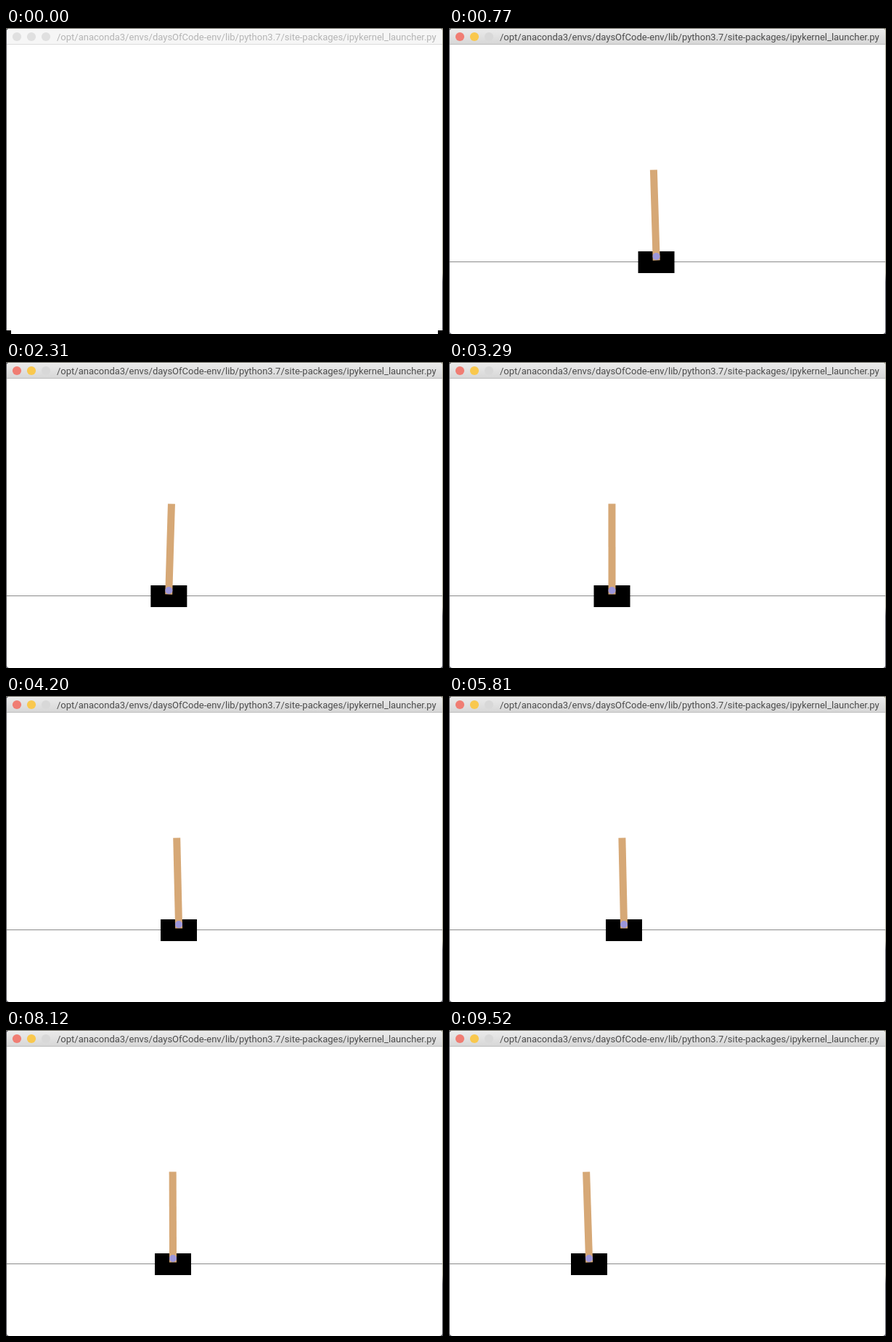
An HTML page for the animation above (9590 ms loop, 602x422 px).

```html
<!DOCTYPE html>
<html lang="en">
<head>
<meta charset="utf-8">
<title>Cart pole</title>
<style>
  html, body { margin: 0; width: 100%; height: 100%; overflow: hidden; background: #fff; }
  svg { display: block; width: 602px; height: 422px; }
  .title { font: 13px Roboto, sans-serif; fill: #4c4c4c; }
  .bar { fill: url(#bar); }
  .rule { fill: #bdbdbd; }
  .close { fill: #f07d73; }
  .minimise { fill: #f9c84e; }
  .zoom { fill: #d8d8d8; }
  .corner { display: none; }
  .idle .title { fill: #b4b4b4; }
  .idle .bar { fill: #f6f6f6; }
  .idle .rule { fill: #dcdcdc; }
  .idle .dot { fill: #e0e0e0; }
  .idle .scene { display: none; }
  .idle .corner { display: inline; }
</style>
</head>
<body>
<svg id="stage" class="idle" viewBox="0 0 602 422">
  <defs>
    <linearGradient id="bar" x2="0" y2="1">
      <stop stop-color="#ebebeb"/><stop offset="1" stop-color="#d7d7d7"/>
    </linearGradient>
    <linearGradient id="right" x2="0" y2="1">
      <stop offset=".8" stop-color="#a5a293"/><stop offset=".83" stop-color="#55555c"/>
    </linearGradient>
    <clipPath id="window"><rect x="1" y="1" width="600" height="421" rx="4"/></clipPath>
  </defs>
  <rect width="301" height="422" fill="#56565c"/>
  <rect x="301" width="301" height="422" fill="url(#right)"/>
  <rect width="602" height="1" fill="#66655c"/>
  <g clip-path="url(#window)">
    <rect width="602" height="422" fill="#fff"/>
    <rect class="bar" y="1" width="602" height="21"/>
    <rect class="rule" y="22" width="602" height="1"/>
  </g>
  <circle class="dot close" cx="15" cy="12" r="6.1"/>
  <circle class="dot minimise" cx="35" cy="12" r="6.1"/>
  <circle class="dot zoom" cx="55" cy="12" r="6.1"/>
  <text class="title" x="70" y="17">/opt/anaconda3/envs/daysOfCode-env/lib/python3.7/site-packages/ipykernel_launcher.py</text>
  <g class="scene">
    <rect x="1" y="322" width="600" height="1" fill="#8a8a8a"/>
    <g id="cart">
      <rect x="-25" y="308" width="50" height="30"/>
      <g id="pole"><rect x="-5" y="195.5" width="10" height="125" fill="#d6a876"/></g>
      <circle cy="315" r="5" fill="#9c96da"/>
    </g>
  </g>
  <path class="corner" d="M0 417h7v5h-7zM595 417h7v5h-7z"/>
</svg>
<script>
  const LOOP = 9590, STEP = 70;
  const GRAVITY = 1225;   // px/s², at 125 px per metre
  const SPAN = 490;       // ms over which the acceleration is measured

  // Key places of the cart: [time in ms, x]
  const keys = [[70, 301], [980, 278], [1470, 251], [1960, 234], [2600, 219.5], [3290, 224.5],
    [3700, 228], [4200, 238], [4700, 241], [5810, 241], [6400, 232.5], [7650, 227],
    [8120, 230], [8470, 233], [8900, 226], [9520, 193], [10100, 149]];
  const last = keys.length - 1;

  function slope(k) {
    if (k === 0) return 0;
    const [t0, x0] = keys[k - 1], [t1, x1] = keys[Math.min(k + 1, last)];
    return (x1 - x0) / (t1 - t0);
  }

  // Smooth cubic through the keys; the cart rests before the first one.
  function cartX(time) {
    const t = Math.max(time, keys[0][0]);
    let i = 0;
    while (i < last - 1 && t > keys[i + 1][0]) i++;
    const [t0, x0] = keys[i], [t1, x1] = keys[i + 1];
    const span = t1 - t0, u = (t - t0) / span, w = 1 - u;
    return w * w * ((1 + 2 * u) * x0 + u * span * slope(i))
         + u * u * ((1 + 2 * w) * x1 - w * span * slope(i + 1));
  }

  // A balanced pole leans towards the cart's acceleration.
  function tilt(t) {
    const bend = cartX(t - SPAN) - 2 * cartX(t) + cartX(t + SPAN);
    const acceleration = bend / (SPAN / 1000) ** 2;
    return Math.atan(acceleration / GRAVITY) * 180 / Math.PI;
  }

  const [stage, cart, pole] = ['stage', 'cart', 'pole'].map(id => document.getElementById(id));
  const start = performance.now();

  function draw() {
    const t = Math.floor((performance.now() - start) % LOOP / STEP) * STEP;
    stage.classList.toggle('idle', t < STEP);
    cart.setAttribute('transform', `translate(${cartX(t).toFixed(2)} 0)`);
    pole.setAttribute('transform', `rotate(${tilt(t).toFixed(3)} 0 315.5)`);
    requestAnimationFrame(draw);
  }
  draw();
</script>
</body>
</html>
```
